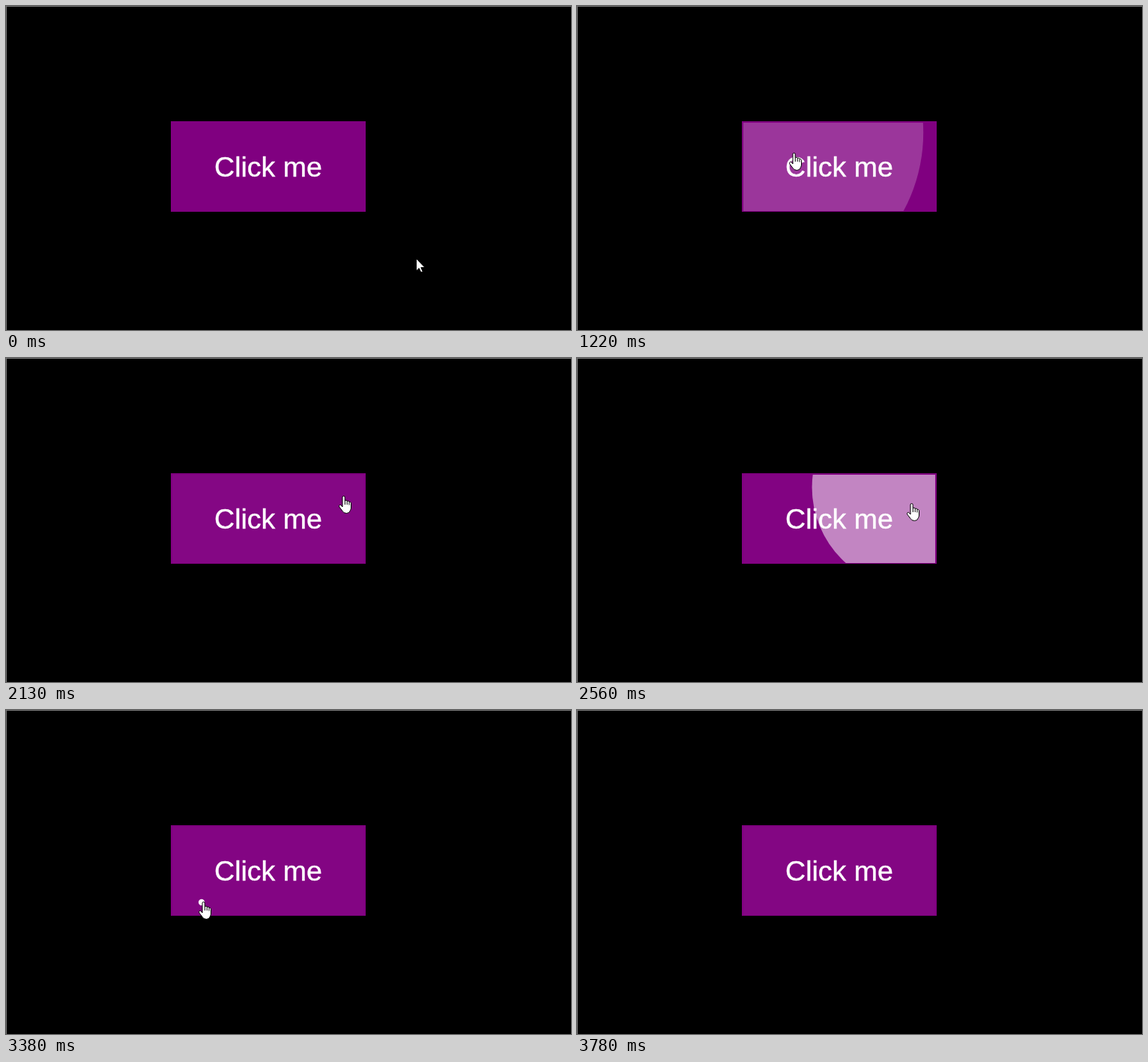
These frames come from a looping animation (754x433 px, 4.4 s). An HTML page with a canvas:

```html
<!DOCTYPE html>
<html lang="en">
<head>
<meta charset="utf-8">
<title>Ripple button</title>
<style>
  html, body { margin: 0; width: 100%; height: 100%; overflow: hidden; background: #000; }
  canvas { display: block; }
</style>
</head>
<body>
<canvas id="stage" width="754" height="433"></canvas>
<script>
const ctx = document.getElementById('stage').getContext('2d');
const LOOP = 4400;
const RIPPLE_TIME = 460;
const RIPPLE_RADIUS = 281;
const FAINTEST = 0.02;
const button = { x: 220, y: 154, w: 260, h: 121 };

const ripples = [
  { start: 944, x: 241, y: 169 },
  { start: 1731, x: 372, y: 237 },
  { start: 2410, x: 449, y: 173 },
  { start: 3377, x: 261, y: 257 }
];

// the pointer rests between moves; bend bows a move sideways
const home = { x: 548, y: 338 };
const moves = [
  { start: 30, end: 720, x: 241, y: 169, bend: 0.4 },
  { start: 1080, end: 1400, x: 358, y: 236, bend: 0 },
  { start: 1650, end: 2010, x: 450, y: 185, bend: 0.5 },
  { start: 2140, end: 2250, x: 449, y: 173, bend: 0 },
  { start: 2480, end: 2740, x: 435, y: 267, bend: 0 },
  { start: 2940, end: 3100, x: 263, y: 257, bend: 0 },
  { start: 3460, end: 3760, x: 544, y: 460, bend: 0 }
];

const arrow = new Path2D('M0 0V16.5L3.7 13L6.3 18.6L8.8 17.5L6.3 12H11.5Z');
const hand = new Path2D(
  'M5 13V2.2Q5 .5 6.6 .5T8.2 2.2V6.8Q8.8 6 10 6.2T11.2 7.6Q12 6.8 13 7.2T14 8.6' +
  'Q14.7 8.1 15.6 8.6T16.5 10.2V16Q16.5 18 15.5 19.6Q14.5 23.5 10.5 23.5' +
  'Q6.5 23.5 5 20.5L1 15.3Q0 13.5 1.2 12.6T3.5 13.2L5 15Z');
const knuckles = new Path2D('M8.3 6.8V12M11.2 7.8V12M14 8.8V12.5');

const smooth = k => k * k * (3 - 2 * k);

// cubic-bezier(0, 0, .58, 1)
function easeOut(p) {
  let low = 0, high = 1;
  for (let i = 0; i < 24; i++) {
    const s = (low + high) / 2;
    if (1.74 * (1 - s) * s * s + s ** 3 < p) low = s; else high = s;
  }
  return smooth(low);
}

function bow(from, to, k) {
  const dx = to.x - from.x, dy = to.y - from.y;
  const side = 2 * k * (1 - k) * to.bend;
  return { x: from.x + dx * k - dy * side, y: from.y + dy * k + dx * side };
}

function pointerAt(t) {
  const i = moves.findLastIndex(move => move.start <= t);
  if (i < 0) return home;
  const move = moves[i];
  const k = Math.min(1, (t - move.start) / (move.end - move.start));
  return bow(moves[i - 1] || home, move, smooth(k));
}

function drawRipple(t) {
  const index = ripples.findLastIndex(r => r.start <= t);
  if (index < 0) return;
  const ripple = ripples[index];
  const { x, y, w, h } = button;
  const grown = easeOut(Math.min(1, (t - ripple.start) / RIPPLE_TIME));
  ctx.save();
  ctx.beginPath();
  ctx.rect(x + 2, y + 2, w - 4, h - 3);
  ctx.clip();
  ctx.fillStyle = '#fff';
  if (index > 0) {
    // last trace of the ripple before
    ctx.globalAlpha = FAINTEST * (1 - grown);
    ctx.fillRect(x, y, w, h);
  }
  ctx.globalAlpha = Math.max(FAINTEST, 1 - grown);
  ctx.beginPath();
  ctx.arc(ripple.x, ripple.y, RIPPLE_RADIUS * grown, 0, 2 * Math.PI);
  ctx.fill();
  ctx.restore();
}

function drawButton(t) {
  const { x, y, w, h } = button;
  ctx.fillStyle = 'purple';
  ctx.fillRect(x, y, w, h);
  drawRipple(t);
  ctx.fillStyle = ctx.strokeStyle = '#fff';
  ctx.lineWidth = 0.4;
  ctx.font = '37.5px "Liberation Sans", Arial, sans-serif';
  ctx.textAlign = 'center';
  ctx.fillText('Click me', x + w / 2, 228);
  ctx.strokeText('Click me', x + w / 2, 228);
}

function drawPointer(t) {
  const { x, y } = pointerAt(t);
  const over = x >= button.x && x < button.x + button.w &&
               y >= button.y && y < button.y + button.h;
  ctx.save();
  ctx.translate(Math.round(x), Math.round(y));
  ctx.translate(over ? -6 : -0.5, over ? -1 : -0.5);
  const shape = over ? hand : arrow;
  ctx.fillStyle = '#fff';
  ctx.strokeStyle = '#000';
  ctx.lineWidth = 1;
  ctx.fill(shape);
  ctx.stroke(shape);
  if (over) ctx.stroke(knuckles);
  ctx.restore();
}

function draw(t) {
  ctx.fillStyle = '#000';
  ctx.fillRect(0, 0, 754, 433);
  ctx.fillStyle = '#777';
  ctx.fillRect(0, 0, 754, 1);
  ctx.fillRect(0, 0, 1, 433);
  drawButton(t);
  drawPointer(t);
}

const began = performance.now();
function tick() {
  draw((performance.now() - began) % LOOP);
  requestAnimationFrame(tick);
}
tick();
</script>
</body>
</html>
```
